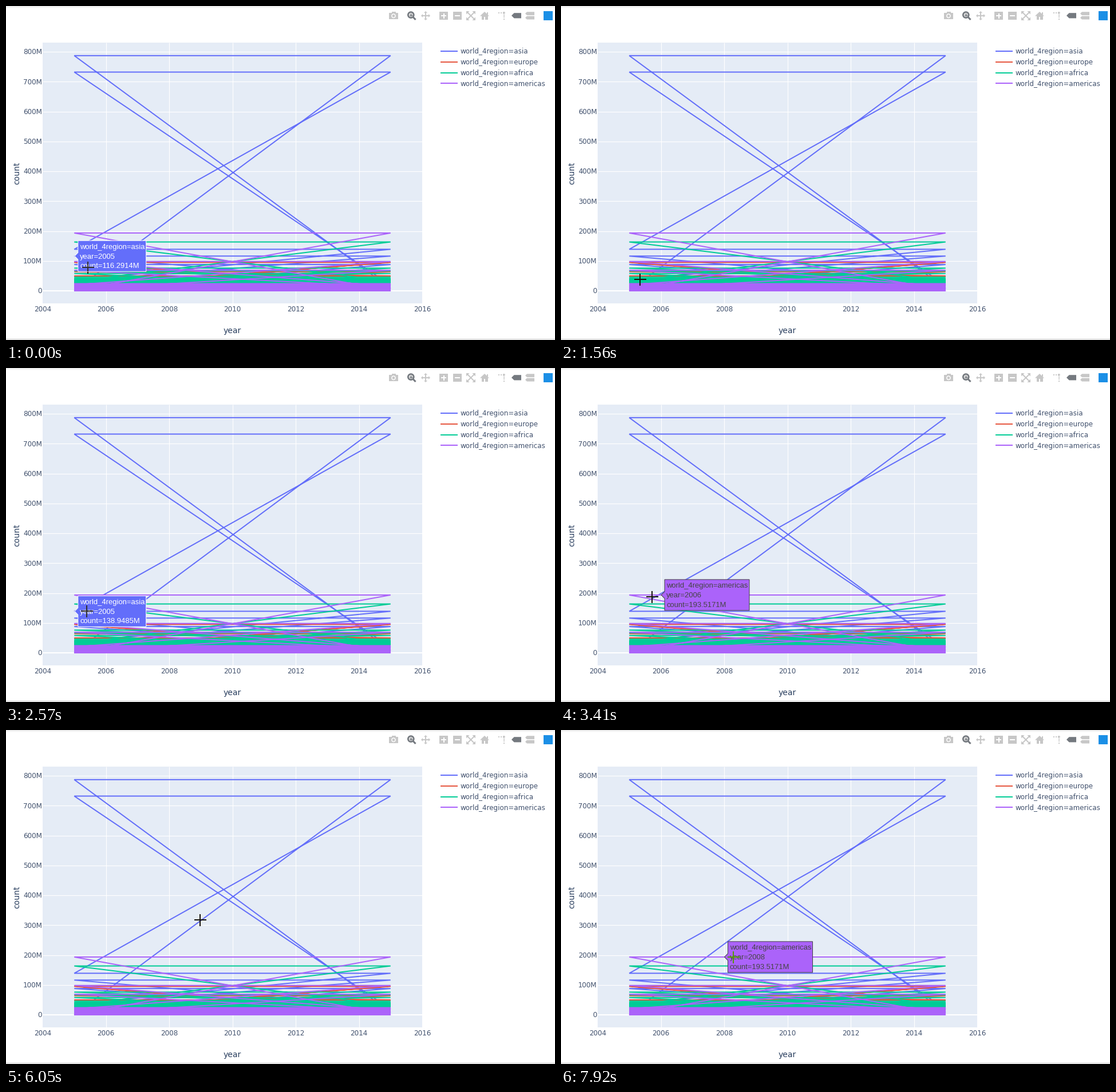
Write a matplotlib script that moves like this. It is 959 px wide and 584 px high and loops after 8000 ms.

```python
import numpy as np
import matplotlib.pyplot as plt
from matplotlib.animation import FuncAnimation
from matplotlib.collections import LineCollection
from matplotlib.patches import Circle, Polygon, Rectangle

W, H, DPI = 959, 584, 100
INTERVAL, FRAMES, STEP = 40, 200, 77.6
PT = 72 / DPI
COLORS = {"asia": "#636efa", "europe": "#e6563f",
          "africa": "#00cc96", "americas": "#ab63fa"}
INK, GREY, ACTIVE = "#42526e", "#c7c7c7", "#74797f"

fig = plt.figure(figsize=(W / DPI, H / DPI), dpi=DPI, facecolor="white")
ax = fig.add_axes([0, 0, 1, 1])
ax.set_xlim(0, W)
ax.set_ylim(H, 0)
ax.axis("off")


def px(year):
    return 64 + 55.25 * (year - 2004)


def py(millions):
    return 498 - 0.5225 * millions


def text(x, y, label, size=12, ha="left", color=INK, font="DejaVu Sans", **kw):
    return ax.text(x, y, label, fontsize=size * PT, ha=ha, va="baseline",
                   color=color, family=font, **kw)


def rect(x0, y0, x1, y1, color, z=1):
    ax.add_patch(Rectangle((x0, y0), x1 - x0, y1 - y0, fc=color, lw=0, zorder=z))


def poly(points, color):
    ax.add_patch(Polygon(points, fc=color, lw=0))


def disc(x, y, r, color):
    ax.add_patch(Circle((x, y), r, fc=color, lw=0))


def segments(lines, color, width, z=1):
    ax.add_collection(LineCollection(lines, colors=color, linewidths=width * PT,
                                     zorder=z))


# ---- page and axes ----
for row, shade in enumerate(("#e9e9e9", "#f1f1f1", "#f7f7f7", "#fbfbfb")):
    rect(0, row, W, row + 1, shade)
rect(0, 582, W, 583.4, "#c2c2c2")
rect(64, 64, 727, 520, "#e5ecf6", 0)

years, counts = range(2004, 2017, 2), range(0, 801, 100)
segments([[(px(y), 64), (px(y), 520)] for y in years if 2004 < y < 2016]
         + [[(64, py(c)), (727, py(c))] for c in counts], "white", 1.2)
segments([[(64, py(0)), (727, py(0))]], "white", 2)
for y in years:
    text(px(y), 534.5, str(y), ha="center")
for c in counts:
    text(63, py(c) + 4.3, f"{c}M" if c else "0", ha="right")
text(395.5, 572, "year", 14, "center", "#2a3f5f")
ax.text(26, 292, "count", fontsize=14 * PT, rotation=90, ha="right",
        va="center", color="#2a3f5f", family="DejaVu Sans")


# ---- data: every value runs 2005-2015, then jumps back to the next ----
def low_values(top, step):
    return np.random.default_rng(4).permutation(np.arange(0, top, step))


SERIES = {
    "asia": [20, 8, 787, 1, 5, 19, 732, 139, 35, 30, 25, 116.3, 33, 15, 88, 4,
             *low_values(45, 5)],
    "europe": [10, 96, 10, 8, 95, 14, 50, 64, 12, 48, 40, *low_values(40, 6)],
    "africa": [32, 163.5, 32, 38, 76, 12, 58, 40, 67, 25, 46, 34,
               *low_values(43, 3)],
    "americas": [1, 193.5, 1, 15, 98.2, 20, 12, 69, 4, *low_values(25, 2)],
}
for order, (region, values) in enumerate(SERIES.items()):
    xs = np.tile([px(2005), px(2015)], len(values))
    ax.plot(xs, py(np.repeat(values, 2)), color=COLORS[region], lw=2 * PT,
            solid_joinstyle="bevel", solid_capstyle="butt", zorder=2 + order)
    y = 78.7 + 18.9 * order
    segments([[(759, y), (789, y)]], COLORS[region], 2)
    text(794, y + 4.3, f"world_4region={region}", 11.9)


# ---- toolbar ----
def toolbar():
    rect(669, 12, 685, 23, GREY)                        # camera
    rect(673.5, 10, 680.5, 12, GREY)
    disc(677, 17.3, 3.9, "white")
    disc(677, 17.3, 2.4, GREY)

    ax.add_patch(Circle((707.3, 15.6), 5, fc="#dddddd", ec=ACTIVE, lw=2.6 * PT))
    segments([[(711, 19.3), (715.5, 24)]], ACTIVE, 3)   # magnifier
    segments([[(704.8, 15.6), (709.8, 15.6)], [(707.3, 13.1), (707.3, 18.1)]],
             ACTIVE, 1.4)

    cx, cy = 733, 17                                    # pan
    segments([[(cx - 6, cy), (cx + 6, cy)], [(cx, cy - 6), (cx, cy + 6)]], GREY, 2)
    for dx, dy in ((1, 0), (-1, 0), (0, 1), (0, -1)):
        poly([(cx + 8 * dx, cy + 8 * dy),
              (cx + 5 * dx + 3 * dy, cy + 5 * dy + 3 * dx),
              (cx + 5 * dx - 3 * dy, cy + 5 * dy - 3 * dx)], GREY)

    for x in (764.5, 788.5):                            # zoom in, zoom out
        rect(x - 7.3, 10, x + 7.3, 24, GREY)
        rect(x - 4.5, 16, x + 4.5, 18, "white")
    rect(763.5, 12.5, 765.5, 21.5, "white")

    cx = 812                                            # autoscale
    segments([[(cx - 6, cy - 6), (cx + 6, cy + 6)],
              [(cx - 6, cy + 6), (cx + 6, cy - 6)]], GREY, 2)
    for sx in (-1, 1):
        for sy in (-1, 1):
            x, y = cx + 8 * sx, cy + 8 * sy
            poly([(x, y), (x - 5.5 * sx, y), (x, y - 5.5 * sy)], GREY)

    poly([(828, 17.5), (836, 10), (844, 17.5)], GREY)   # home
    rect(840, 11, 842, 15, GREY)
    rect(830.5, 16.5, 841.5, 23.5, GREY)
    rect(834.7, 19, 837.3, 23.5, "white")

    for x, y in ((860.5, 12), (864.5, 12), (870, 15.8), (870, 19.3), (870, 22.8)):
        rect(x - 1, y - 1, x + 1, y + 1, GREY)          # spike lines
    disc(869.8, 12, 2, GREY)

    def tag(x, y, w, h, color):
        poly([(x, y), (x + h, y - h), (x + w, y - h), (x + w, y + h),
              (x + h, y + h)], color)

    tag(883, 16.8, 17, 4.6, ACTIVE)
    tag(907, 13.2, 16, 2.9, GREY)
    tag(907, 20.6, 16, 2.9, GREY)
    rect(938.5, 9, 954.5, 25, "#1b8fe6")


toolbar()

# ---- hover label and crosshair ----
# start ms, end ms, region, year, count in millions
HOVERS = [
    (0, 150, "asia", 2005, "116.2914"),
    (925, 1470, "africa", 2005, "19.31701"),
    (1855, 2320, "americas", 2005, "98.1711"),
    (2400, 2640, "asia", 2005, "138.9485"),
    (3330, 3960, "americas", 2006, "193.5171"),
    (6280, 6470, "americas", 2008, "193.5171"),
    (7350, 8100, "americas", 2008, "193.5171"),
]
BOX_WIDTH = {"asia": 119, "africa": 127.5, "americas": 148}
CROSS_ON = {"asia": "#33302c", "africa": "#e8505f", "americas": "#549c05"}

# time in ms, x, y of the pointer
PATH = np.array([
    (0, 143, 457), (75, 143, 457), (155, 142, 472), (640, 142, 472),
    (1000, 138, 490), (1390, 138, 490), (1930, 137, 449), (2170, 137, 449),
    (2790, 143, 411), (2900, 143, 411), (3405, 159, 400), (3740, 173, 391),
    (4560, 214, 367), (4730, 226, 358), (5430, 360, 288), (5500, 361, 288),
    (5740, 379, 284), (5850, 379, 284), (6330, 284, 397), (6670, 255, 431),
    (6830, 256, 453), (6980, 261, 439), (7510, 291, 402), (7900, 301, 397),
    (8100, 301, 397)])

label = Polygon([(0, 0), (1, 0), (1, 1)], lw=PT, zorder=11, joinstyle="miter")
ax.add_patch(label)
rows = [text(0, 0, "", 13, font="Liberation Sans", zorder=12) for _ in range(3)]


def crosshair(z):
    return ax.plot([], [], lw=2 * PT, color="#15110a", zorder=z,
                   solid_capstyle="butt")[0]


cross, cross_on_label = crosshair(10), crosshair(13)


def show_label(region, year, count):
    x, y = px(year) + 0.5, py(float(count))
    left, right = x + 6, x + 6 + BOX_WIDTH[region]
    label.set_xy([(x, y), (left, y - 6), (left, y - 27), (right, y - 27),
                  (right, y + 27), (left, y + 27), (left, y + 6)])
    edge = "white" if region == "asia" else "#444444"
    label.set_facecolor(COLORS[region])
    label.set_edgecolor(edge)
    lines = (f"world_4region={region}", f"year={year}", f"count={count}M")
    for i, (row, line) in enumerate(zip(rows, lines)):
        row.set_text(line)
        row.set_position((x + 9.3, y + 4.3 + 16.7 * (i - 1)))
        row.set_color(edge)
    cross_on_label.set_color(CROSS_ON[region])
    cross_on_label.set_clip_path(label)


def update(frame):
    t = (frame * INTERVAL + 30) // STEP * STEP
    x, y = (round(np.interp(t, PATH[:, 0], PATH[:, k])) for k in (1, 2))
    for line in (cross, cross_on_label):
        line.set_data([x - 10, x + 11, np.nan, x, x],
                      [y, y, np.nan, y - 10, y + 11])
    hover = next((h[2:] for h in HOVERS if h[0] <= t < h[1]), None)
    for artist in (label, cross_on_label, *rows):
        artist.set_visible(hover is not None)
    if hover:
        show_label(*hover)
    return [label, cross, cross_on_label, *rows]


anim = FuncAnimation(fig, update, frames=FRAMES, interval=INTERVAL,
                     repeat=True, repeat_delay=0)
plt.show()
```
